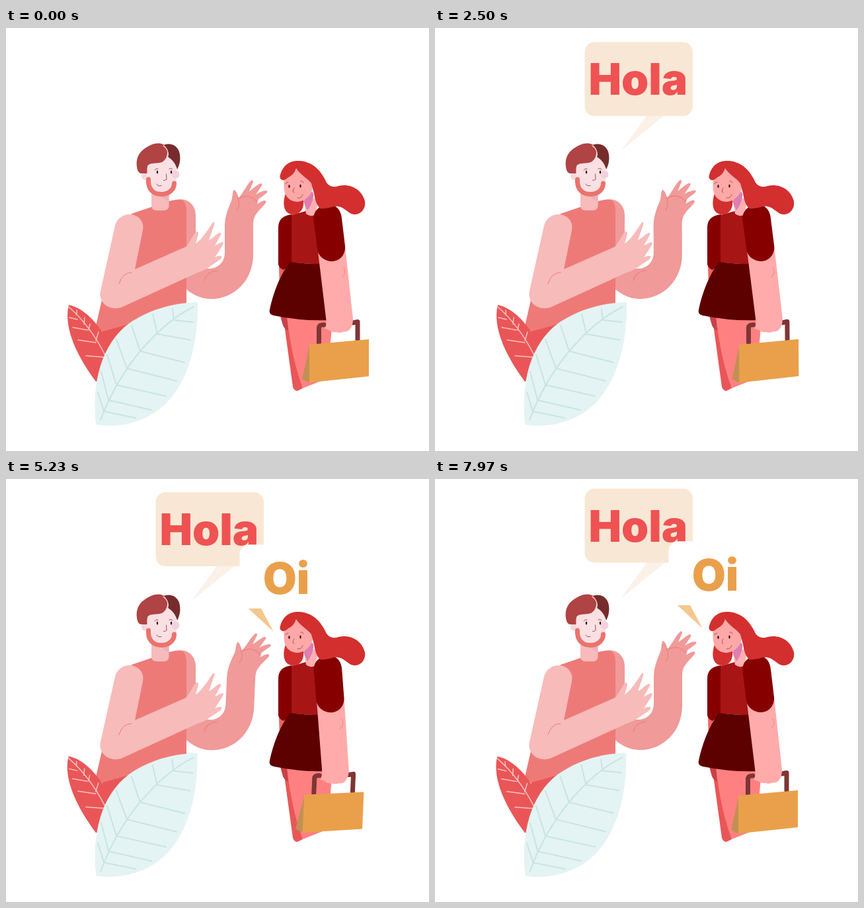
Animation, 640 px wide and 640 px high, one loop 8 s. Source, as an HTML page with a canvas:

```html
<!DOCTYPE html>
<html lang="es">
<head>
<meta charset="utf-8">
<title>Hola, Oi</title>
<style>
html, body { margin: 0; width: 100%; height: 100%; overflow: hidden; background: #fff; }
canvas { display: block; width: 100vw; height: 100vh; }
</style>
</head>
<body>
<canvas id="stage"></canvas>
<script>
const SIZE = 640, LOOP = 8000;
const canvas = document.getElementById('stage');
const ctx = canvas.getContext('2d');

const fill = (color, d) => { ctx.fillStyle = color; ctx.fill(new Path2D(d)); };

function line(color, width, d) {
  ctx.strokeStyle = color;
  ctx.lineWidth = width;
  ctx.lineCap = ctx.lineJoin = 'round';
  ctx.stroke(new Path2D(d));
}

function oval(color, x, y, rx, ry = rx) {
  ctx.fillStyle = color;
  ctx.beginPath();
  ctx.ellipse(x, y, rx, ry, 0, 0, Math.PI * 2);
  ctx.fill();
}

function box(color, x, y, w, h, r) {
  ctx.fillStyle = color;
  ctx.beginPath();
  ctx.roundRect(x, y, w, h, r);
  ctx.fill();
}

function word(text, color, x, y) {
  ctx.font = '900 66px Inter, sans-serif';
  ctx.textAlign = 'center';
  ctx.textBaseline = 'alphabetic';
  ctx.fillStyle = color;
  ctx.fillText(text, x, y);
}

// Draw with a rotation and scale around a pivot.
function around(x, y, angle, scale, draw) {
  ctx.save();
  ctx.translate(x, y);
  ctx.rotate(angle);
  ctx.scale(scale, scale);
  ctx.translate(-x, -y);
  draw();
  ctx.restore();
}

// Smooth curve through [time, value] keys, flat at both ends and at peaks.
function track(keys) {
  const slope = i => {
    if (i === 0 || i === keys.length - 1) return 0;
    const [a, b, c] = [keys[i - 1], keys[i], keys[i + 1]];
    if ((b[1] - a[1]) * (c[1] - b[1]) <= 0) return 0;
    return (c[1] - a[1]) / (c[0] - a[0]);
  };
  return t => {
    if (t <= keys[0][0]) return keys[0][1];
    const i = keys.findIndex(k => k[0] > t) - 1;
    if (i < 0) return keys[keys.length - 1][1];
    const [t0, v0] = keys[i], [t1, v1] = keys[i + 1];
    const d = t1 - t0, u = (t - t0) / d, u2 = u * u, u3 = u2 * u;
    return v0 * (2 * u3 - 3 * u2 + 1) + v1 * (3 * u2 - 2 * u3)
      + d * (slope(i) * (u3 - 2 * u2 + u) + slope(i + 1) * (u3 - u2));
  };
}

const swing = track([[500, 0], [950, .04], [1480, .083], [1870, .07], [2450, 0], [2970, -.058],
  [3130, -.08], [3360, -.091], [3870, -.041], [3970, -.027], [4180, 0], [4850, .052],
  [5230, .043], [5800, .018], [6400, .002], [6800, 0]]);
const leafTurn = track([[4700, 0], [5150, -.004], [5600, 0], [6330, .036], [6830, .063], [7250, .042], [7970, -.008]]);
const holaRise = track([[4200, 0], [5230, -1.2], [6330, -4], [6870, -6], [7970, -6.7]]);
const oiRise = track([[5000, 0], [6900, -6.2], [7970, -5.3]]);
const tailX = track([[4200, 0], [5230, -.9], [6870, -3], [7970, -1]]);
const tailY = track([[4200, 0], [5230, -1], [6870, -2.5], [7970, -4.2]]);

const pop = (t, start) => Math.sin(Math.min(1, Math.max(0, (t - start) / 850)) * Math.PI / 2);

function manBackArm(angle) {
  const skin = '#f09a99', crease = '#ee7a78';
  fill(skin, 'M258 260C274 256 287 267 287 284V388H262Z');
  around(302, 373, angle, 1, () => {
    fill(skin, `M262 385Q285 410 310 410C346 410 374 381 374 343V300C374 289 376 285 379 281
      C382 276 388 271 392 266Q395 262 392 261C388 261 384 264 380 266L382 259L394 250Q397 247 394 246
      C388 246 383 249 378 252L386 240Q389 236 386 235C381 236 374 243 368 247L374 233Q374 229 371 231
      C364 237 359 250 352 257L349 249Q345 243 344 246C342 252 343 258 340 264C336 273 331 286 331 300
      V340C331 355 320 364 308 364L280 362Z`);
    line(crease, 1, 'M350 256Q356 268 349 276M352 258Q368 249 380 263M300 382Q304 368 319 367');
  });
}

function manBody() {
  fill('#ea5657', 'M145 458L273 414V452L160 520Z');
  fill('#ee7a78', 'M190 281L243 263Q262 257 268 261Q273 266 273 276V417Q205 444 146 459L135 455L150 390Z');
  box('#f7bbba', 220, 240, 26.5, 36, 7);
  fill('#ecb0bd', 'M233 250H246.500V262Q238 260 233 252Z');
}

function manHead() {
  const ink = '#7c3038';
  oval('#f9d6d9', 210, 224, 5, 5.500);
  fill('#fae0e2', 'M213 204V232C213 246 223 254 235 254C248 254 258 245 258 232V205C256 185 240 178 225 198Z');
  oval('#f3d0dd', 256.500, 221.500, 6);
  line('#ea736d', 7, 'M215.500 229V233C216 245 224 251.500 235 251.500C247 251.500 254.500 244 254.500 235');
  fill('#762c2c', 'M236 178C245 173 258 175 262 187C265 197 263 207 259 214C257 206 252 199 245 195C247 188 243 181 236 178Z');
  fill('#b04343', `M213.500 220H204Q199 219 198 210C196 193 205 184 217 178C228 172 240 174 243 181
    C246 190 243 199 236 203C228 206 219 203 214.500 208Q213 211 213.500 220Z`);
  line('#fae0e2', 1.200, 'M238 178C244 182 247 189 244 196');
  oval('#29141a', 229, 218, 1.200, 2.500);
  oval('#29141a', 250, 218, 1.200, 2.500);
  line(ink, .8, 'M225 215Q227 212 230 213M247 213Q250 211 252 214M242.500 221L243 229Q241 231 238.500 230.500M228 236Q230 240 235 238.500');
}

function manFrontArm() {
  fill('#f7bbba', `M165 299C168 288 177 282 187 282C200 282 210 293 207 306L195 365L272 331
    C278 325 283 313 287 309Q291 306 291 312L287 326C296 321 307 303 313 294Q316 292 315 298L307 321
    C312 319 318 312 323 310Q326 309 325 313L316 329C320 328 324 324 328 324Q330 325 327 330L316 347
    C319 346 322 344 326 345Q327 348 323 351L305 363C300 367 295 368 290 370L174 423C157 428 139 416 143 398Z`);
  line('#ee7a78', 1, 'M171 387Q176 370 190 370');
}

function leaves(angle) {
  around(196, 521, angle, 1, () => {
    fill('#ea5657', 'M95 419C112 422 130 437 145 459L172 500L150 530L136 535C110 500 86 455 95 419Z');
    line('#f8c4c2', 1.500, `M95 422Q128 451 150 495M96 438L108 441M101 453L123 457M109 472L136 476M121 496L149 498
      M107 427L107 434M119 438L118 448M127 448L125 457M140 460L136 473`);
    fill('#e4f3f3', `M290 415C250 416 215 427 186 447C145 478 129 535 136 600
      C170 606 215 597 245 565C275 532 291 480 290 415Z`);
    line('#c8e5e2', 2, `M284 422Q245 440 203 489Q165 535 143 593
      M252 425L254 442L283 445M222 433L229 463L279 472M190 450L203 489L270 506M167 471L183 515L258 534
      M153 494L167 540L242 557M144 520L155 563L220 578M139 551L148 580L196 590`);
  });
}

function girlBody() {
  fill('#ea6565', 'M412.500 345H426V372L414 392Z');
  fill('#ea5657', 'M419 434L434 543Q436 549 441 549L449 545L437 490L428 436Z');
  fill('#c9404a', 'M414 432L419 450Q422 456 427 458L425 436Z');
  fill('#ff8080', 'M425 436Q432 500 449 545L484 531Q490 495 494 438Z');
  fill('#860000', 'M412 302Q412 284 433 282V356L420 366Q414 364 412 358Z');
  fill('#a81515', 'M432 283L464 274L474 285L482 358L432 355Z');
  fill('#5c0000', 'M430 354Q450 357 480 357L496 434Q497 441 490 442Q450 444 405 435Q397 433 399 426C404 402 414 374 430 354Z');
  fill('#ffb0b0', 'M450 258L454 281Q461 287 468 282L473 258Z');
  fill('#dd7fb0', 'M450 262L463 247Q466 250 465 256Q463 267 456 276Z');
}

function girlArm(angle) {
  around(486, 296, angle, 1, () => {
    line('#7f3535', 7, 'M473.500 476V453Q474 449 481 449M532 472V444.500L525 446');
    fill('#c19052', 'M460 478L448 531L460 537Z');
    fill('#eaa04b', 'M459 479L549 471V527L459 536.500Z');
    fill('#ffabab', `M471 330L484 438Q486 450 482 455L489 457Q493 461 500 460Q506 462 511 459.500
      Q517 460 520 456Q525 451 525 440L513 330Z`);
    line('#f28585', 1, 'M511 362Q516 370 509 377');
    fill('#860000', `M465.500 291C464 276 476 267 488 267C500 267 507 276 508 288L513 330
      C514 344 504 353 493 353C482 353 472 345 471 335Z`);
  });
}

function girlHead() {
  const hair = '#d32f2f', ink = '#a8323c';
  fill(hair, 'M424 248C417 265 420 282 434 282C446 282 453 272 449 256Z');
  fill('#ffa8a8', 'M420.500 228V240C421 254 428 262 440 263C454 263 466 249 464 235L450 208H436Z');
  fill(hair, `M415 222C420 205 432 200 445 201C466 203 478 218 485 234Q492 243 503 239
    C520 235 538 243 543 262C545 275 535 283 526 282C515 280 512 268 496 270Q486 274 475 273
    Q468 266 466 250L462 235C455 226 445 222 439 212Q436 222 427 226Q422 231 418 230Q413 228 415 222Z`);
  oval('#29141a', 428.500, 239.500, 1.200, 2.500);
  oval('#29141a', 445.500, 239, 1.200, 2.500);
  line(ink, .8, 'M423 236Q424 233 427 233M446 232Q449 231 450 234M436 242Q432 248 436 249M441 257Q447 258 449 252');
}

function holaBubble(t) {
  const scale = pop(t, 767);
  if (!scale) return;
  around(284, 184, 0, scale, () => {
    ctx.save();
    ctx.translate(tailX(t), tailY(t));
    fill('#fbf1e6', 'M282 185L329 121H361Z');
    ctx.restore();
    ctx.translate(0, holaRise(t));
    box('#f9e7d5', 226.500, 21.300, 163.500, 112, 15);
    word('Hola', '#ef5252', 307.300, 101.300);
  });
}

function oiBubble(t) {
  const scale = pop(t, 3030);
  if (!scale) return;
  around(406, 236, 0, scale, () => {
    ctx.translate(0, oiRise(t));
    fill('#f4c78f', 'M366.500 196H386L404.500 231Z');
    box('#fff', 353.500, 99.500, 141, 96.500, 15);
    word('Oi', '#eaa04b', 424, 174);
  });
}

function draw(t) {
  const angle = swing(t);
  manBackArm(angle);
  manBody();
  manHead();
  manFrontArm();
  leaves(leafTurn(t));
  girlBody();
  girlArm(angle);
  girlHead();
  holaBubble(t);
  oiBubble(t);
}

function frame() {
  const ratio = window.devicePixelRatio || 1;
  const w = Math.round(innerWidth * ratio), h = Math.round(innerHeight * ratio);
  if (canvas.width !== w || canvas.height !== h) {
    canvas.width = w;
    canvas.height = h;
  }
  ctx.setTransform(1, 0, 0, 1, 0, 0);
  ctx.fillStyle = '#fff';
  ctx.fillRect(0, 0, w, h);
  const k = Math.min(w, h) / SIZE;
  ctx.setTransform(k, 0, 0, k, (w - SIZE * k) / 2, (h - SIZE * k) / 2);
  draw(performance.now() % LOOP);
  requestAnimationFrame(frame);
}
frame();
</script>
</body>
</html>
```
